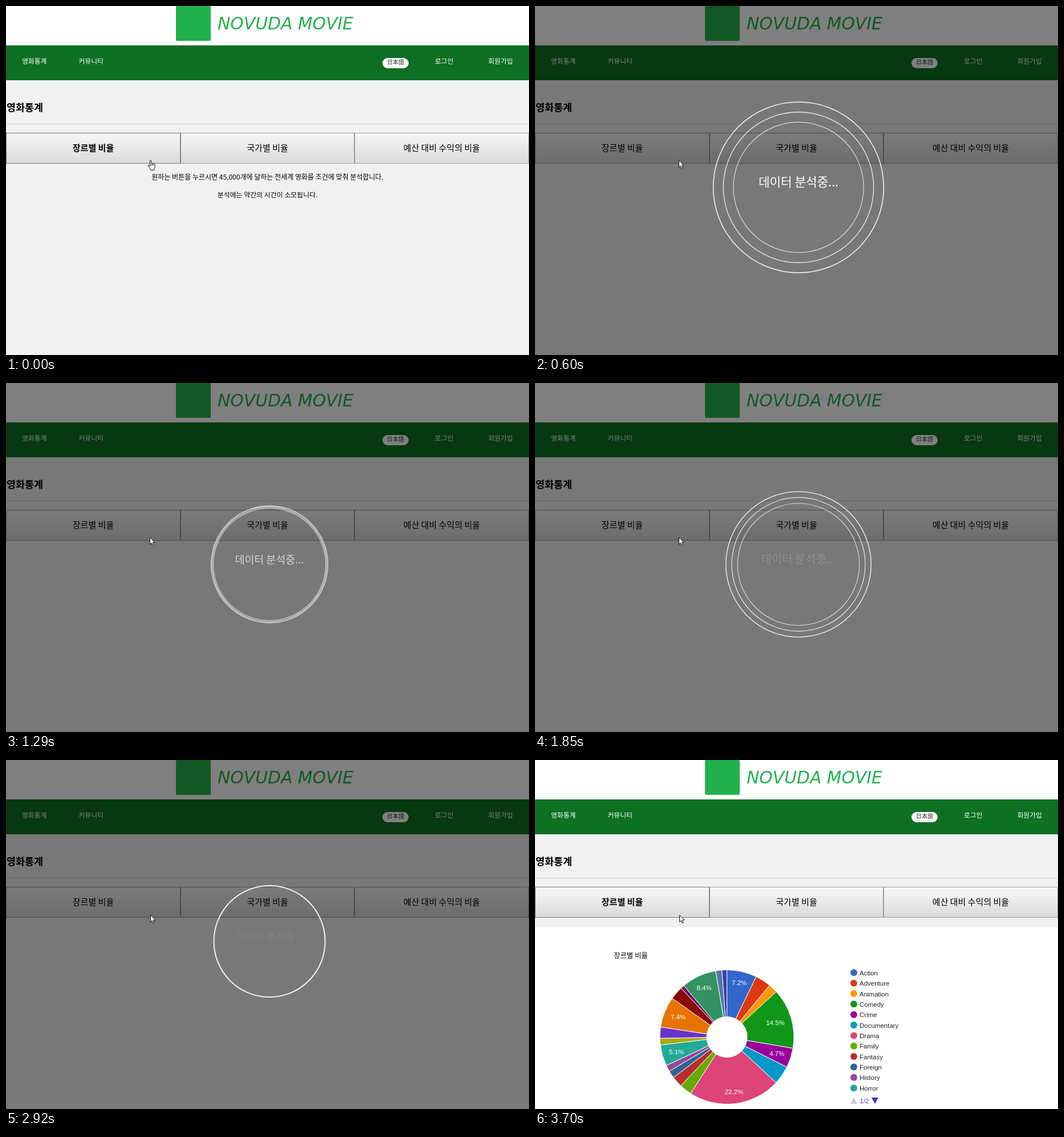
An HTML page with a canvas that plays this animation: 917x611 px, repeating every 4.34 s.

```html
<!DOCTYPE html>
<html lang="ko">
<head>
<meta charset="utf-8">
<title>영화통계</title>
<style>
html, body { margin: 0; width: 100%; height: 100%; overflow: hidden; background: #f1f1f1; }
canvas { display: block; }
</style>
</head>
<body>
<canvas id="stage" width="917" height="611"></canvas>
<script>
const ctx = document.getElementById('stage').getContext('2d');
const W = 917, H = 611, LOOP = 4340;
const CLICK = 70, LOADED = 3240, HOVER = 3330, CHART = 3700;
const KOREAN = '"Noto Sans CJK KR", "Noto Sans CJK", sans-serif';
const LATIN = '"Liberation Sans", Arial, sans-serif';
const GREEN = '#22b14c';

// each wave rises for `half` ms, and falls for as long from `fall` on
const PULSE = { start: 122, period: 1500, half: 740, fall: 710 };
const BLINK = { start: 95, period: 1000, half: 500, fall: 500 };

// name, share in percent, colour
const genres = [
  ['Action', 7.2, '#3366cc'], ['Adventure', 3.8, '#dc3912'],
  ['Animation', 2.2, '#ff9900'], ['Comedy', 14.5, '#109618'],
  ['Crime', 4.7, '#990099'], ['Documentary', 4.5, '#0099c6'],
  ['Drama', 22.2, '#dd4477'], ['Family', 3, '#66aa00'],
  ['Fantasy', 2.6, '#b82e2e'], ['Foreign', 1.8, '#316395'],
  ['History', 1.5, '#994499'], ['Horror', 5.1, '#22aa99'],
  ['', 1.6, '#aaaa11'], ['', 2.7, '#6633cc'], ['', 7.4, '#e67300'],
  ['', 3.2, '#8b0707'], ['', 0.9, '#651067'], ['', 8.4, '#329262'],
  ['', 1.5, '#5574a6'], ['', 1.2, '#3b3eac']
];
const shareLabels = [
  ['7.2%', 358, 390], ['14.5%', 421.5, 460], ['4.7%', 424, 514], ['22.2%', 349, 581],
  ['5.1%', 248, 511], ['7.4%', 251, 450], ['8.4%', 296.5, 398.5]
];

function rect(x, y, w, h, fill) {
  ctx.fillStyle = fill;
  ctx.fillRect(x, y, w, h);
}

function roundRect(x, y, w, h, r, fill) {
  ctx.beginPath();
  ctx.roundRect(x, y, w, h, r);
  ctx.fillStyle = fill;
  ctx.fill();
}

// y is the vertical middle of the glyphs
function text(str, x, y, size, { color = '#000', align = 'left', style = '', family = KOREAN } = {}) {
  ctx.font = `${style} ${size}px ${family}`;
  ctx.fillStyle = color;
  ctx.textAlign = align;
  ctx.fillText(str, x, y + size * 0.37);
}

function polygon(points, fill, stroke) {
  ctx.beginPath();
  points.forEach(([x, y]) => ctx.lineTo(x, y));
  ctx.closePath();
  ctx.fillStyle = fill;
  ctx.fill();
  if (stroke) {
    ctx.strokeStyle = stroke;
    ctx.lineWidth = 1;
    ctx.stroke();
  }
}

// cubic-bezier(.25, .1, .25, 1), clamped to 0..1
function ease(x) {
  if (x <= 0) return 0;
  if (x >= 1) return 1;
  const bezier = (a, b, u) => 3 * a * u * (1 - u) ** 2 + 3 * b * u * u * (1 - u) + u ** 3;
  let lo = 0, hi = 1;
  for (let i = 0; i < 24; i++) {
    const mid = (lo + hi) / 2;
    if (bezier(0.25, 0.25, mid) < x) lo = mid; else hi = mid;
  }
  return bezier(0.1, 1, lo);
}

function wave(time, { start, period, half, fall }) {
  const t = Math.max(0, time - start) % period;
  return Math.min(ease(t / half), 1 - ease((t - fall) / half));
}

function drawHeader() {
  rect(0, 0, W, 69, '#fff');
  roundRect(298, 0, 61, 61, 2, GREEN);
  text('NOVUDA MOVIE', 371, 30, 29.8,
    { color: GREEN, style: 'italic', family: '"DejaVu Sans", Verdana, sans-serif' });

  rect(0, 69, W, 61, '#0e7022');
  const white = { color: '#fff' };
  text('영화통계', 28, 97, 11.8, white);
  text('커뮤니티', 127.5, 97, 11.8, white);
  text('로그인', 752, 97, 11.8, white);
  text('회원가입', 845.5, 97, 11.8, white);
  roundRect(659.5, 90.5, 47, 19, 9.5, '#0a5a1a');
  roundRect(660, 91, 46, 18, 9, '#fff');
  text('日本語', 683, 98.5, 10, {
    color: '#12351a', align: 'center', family: '"Noto Sans CJK JP", "Noto Sans CJK", sans-serif'
  });
}

function drawTabs(active) {
  text('영화통계', 1, 178, 17.4, { style: 'bold' });
  rect(0, 206, W, 1, '#d0d0d0');
  const shade = ctx.createLinearGradient(0, 222, 0, 276);
  shade.addColorStop(0, '#f8f8f8');
  shade.addColorStop(1, '#dadada');
  ['장르별 비율', '국가별 비율', '예산 대비 수익의 비율'].forEach((label, i) => {
    const x = Math.round(i * W / 3), w = Math.round((i + 1) * W / 3) - x;
    const on = active && i === 0;
    rect(x, 222, w, 54, shade);
    ctx.strokeStyle = on ? '#767676' : '#9c9c9c';
    ctx.lineWidth = 1;
    ctx.strokeRect(x + 0.5, 222.5, w - 1, 53);
    text(label, x + w / 2, 248, 15, { align: 'center', style: on ? 'bold' : '' });
  });
}

function drawIntro() {
  text('원하는 버튼을 누르시면 45,000개에 달하는 전세계 영화를 조건에 맞춰 분석합니다.',
    458.5, 300, 12, { align: 'center' });
  text('분석에는 약간의 시간이 소모됩니다.', 458.5, 331, 11.9, { align: 'center' });
}

function drawLoader(time) {
  rect(0, 0, W, H, 'rgba(0,0,0,.5)');
  const grow = wave(time, PULSE);
  const cx = 462, cy = 317.5;
  [[0.6, 0.9], [0.4, 0.82], [0.2, 0.72]].forEach(([gain, alpha]) => {
    const scale = 1 + gain * grow;
    ctx.beginPath();
    ctx.arc(cx, cy, 96.5 * scale, 0, Math.PI * 2);
    ctx.strokeStyle = `rgba(255,255,255,${alpha})`;
    ctx.lineWidth = scale;
    ctx.stroke();
  });
  ctx.save();
  ctx.globalAlpha = wave(time, BLINK);
  ctx.translate(cx, cy);
  ctx.scale(1 + 0.2 * grow, 1 + 0.2 * grow);
  text('데이터 분석중...', 0, -8, 18, { color: '#fff', align: 'center', style: '500' });
  ctx.restore();
}

function drawChart() {
  const cx = 336.5, cy = 485;
  text('장르별 비율', 138, 342, 12.4);

  let angle = -Math.PI / 2;
  ctx.strokeStyle = '#fff';
  ctx.lineWidth = 1;
  const turn = Math.PI * 2 / genres.reduce((sum, g) => sum + g[1], 0);
  for (const [, share, color] of genres) {
    const end = angle + share * turn;
    ctx.beginPath();
    ctx.arc(cx, cy, 117.5, angle, end);
    ctx.arc(cx, cy, 35.5, end, angle, true);
    ctx.closePath();
    ctx.fillStyle = color;
    ctx.fill();
    ctx.stroke();
    angle = end;
  }
  for (const [label, x, y] of shareLabels)
    text(label, x, y, 11.5, { color: '#fff', align: 'center', family: LATIN });

  genres.slice(0, 12).forEach(([name, , color], i) => {
    const y = 372.3 + i * 18.35;
    ctx.beginPath();
    ctx.arc(559, y, 6, 0, Math.PI * 2);
    ctx.fillStyle = color;
    ctx.fill();
    text(name, 569, y + 0.4, 11.5, { color: '#222', family: LATIN });
  });
  polygon([[553, 602], [559, 591], [565, 602]], '#ccc');
  text('1/2', 569.5, 597, 11.5, { color: '#3344b8', family: LATIN });
  polygon([[590, 591], [602, 591], [596, 602]], '#3a3ab4');
}

function drawCursor(time) {
  ctx.save();
  if (time < CLICK) {
    ctx.translate(248.5, 269.5);
    polygon([[4, 1], [5, 0.5], [6, 1], [6.5, 6], [8, 5.5], [9, 6.5], [10.5, 6.3], [11.3, 7.5],
      [12.5, 8], [12.5, 13], [11, 16], [11, 18], [5, 18], [4, 15], [1, 11], [1, 9.5], [2.5, 9.5],
      [4, 11]], '#fff', '#111');
    ctx.beginPath();
    for (const x of [6.5, 9]) { ctx.moveTo(x, 6); ctx.lineTo(x, 10); }
    ctx.stroke();
  } else {
    const shift = time < 2290 ? 0 : 1;
    ctx.translate(252.5 + shift, 270.5 + shift);
    polygon([[0, 0], [0, 12], [2.7, 9.6], [4.7, 14], [6.7, 13.2], [4.8, 8.8], [8.4, 8.6]],
      '#fff', '#111');
  }
  ctx.restore();
}

function render(time) {
  rect(0, 0, W, H, '#f1f1f1');
  drawHeader();
  drawTabs(time < CLICK || time >= HOVER);
  if (time < CLICK) drawIntro();
  else if (time < LOADED) drawLoader(time);
  else rect(0, 293, W, H - 293, '#fff');
  if (time >= CHART) drawChart();
  drawCursor(time);
}

const start = performance.now();
function tick() {
  render((performance.now() - start) % LOOP);
  requestAnimationFrame(tick);
}
tick();
</script>
</body>
</html>
```
